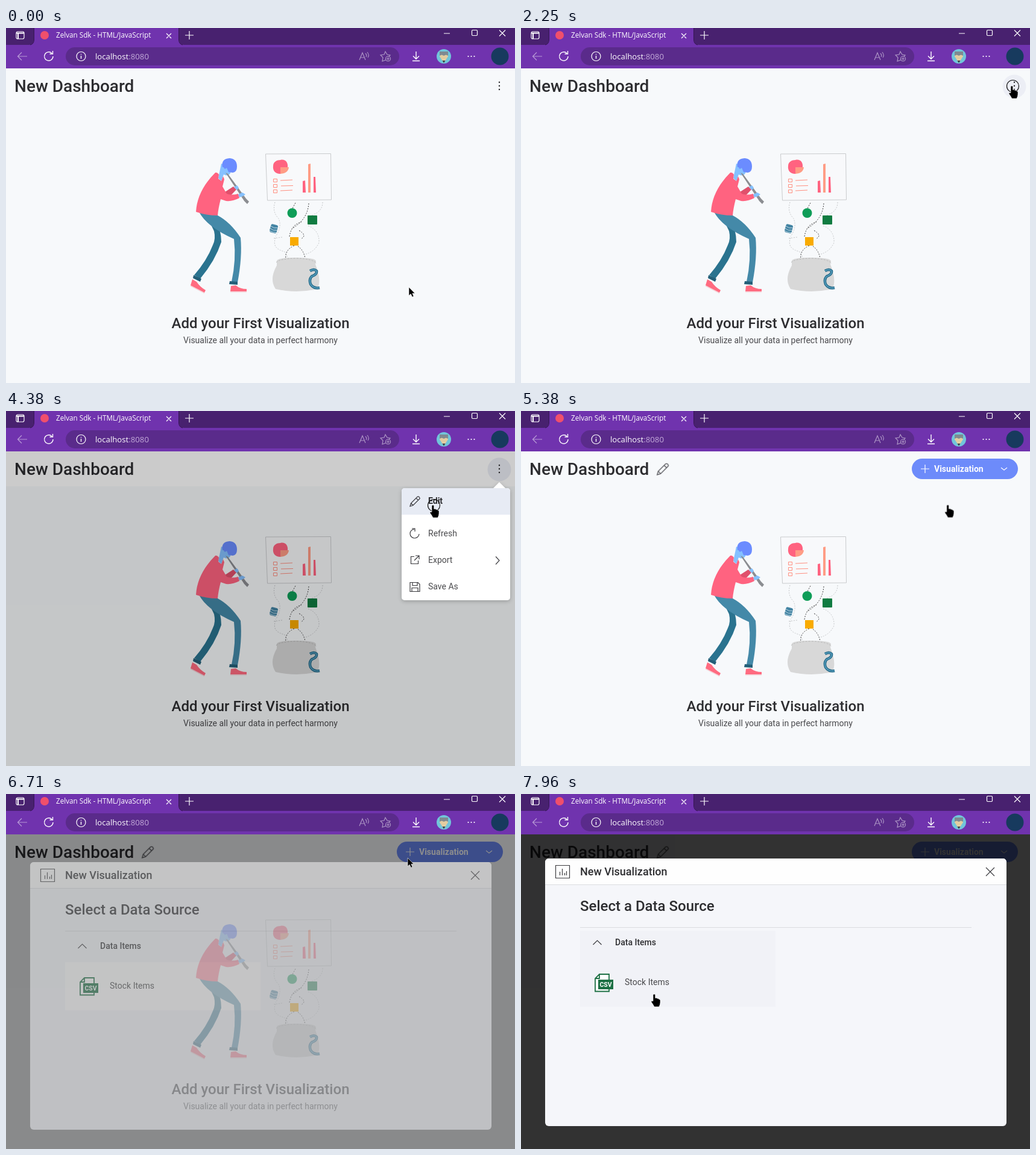
An HTML page that plays this animation: 844x589 px, repeating every 8000 ms.

```html
<!DOCTYPE html>
<html lang="en">
<head>
<meta charset="utf-8">
<title>New Dashboard</title>
<style>
html, body { margin: 0; width: 100%; height: 100%; overflow: hidden; background: #f7f9fb; }
svg { display: block; width: 844px; height: 589px; }
text { font-family: Roboto, sans-serif; fill: #2d2d30; }
.ui { font-family: "Open Sans", "Noto Sans", sans-serif; fill: #fff; }
.h1 { font-size: 28px; font-weight: 500; }
.h2 { font-size: 24px; font-weight: 500; }
.h3 { font-size: 18px; font-weight: 500; }
.p { font-size: 14px; fill: #4a4a4d; }
.m { font-size: 14px; font-weight: 500; }
.b { font-size: 14px; font-weight: 700; }
.ln { fill: none; stroke: #3c3c40; stroke-width: 1.2; }
.w { fill: none; stroke: #fff; stroke-width: 1.2; }
.dim { opacity: .5; }

.st { opacity: 0; animation: 8s step-end infinite; }
#head { animation-name: head; }
#hover { animation-name: hover; }
#edit { animation-name: edit; }
#press { animation-name: press; }
#shade { animation-name: shade; }
#menu { animation-name: menu; }
#row { animation-name: row; }
#dark { animation-name: dark; }
#dialog { animation-name: dialog; }
#card { animation-name: card; }
#ring { animation-name: ring; }
#hand { animation-name: hand; }
#arrow { animation-name: arrow; }
#view { animation: view 8s step-end infinite; }
#cur { animation: move 8s ease-in-out infinite; }

@keyframes head { 0%, 57.875% { opacity: 0 } 30% { opacity: 1 } }
@keyframes hover { 0%, 56.875% { opacity: 0 } 16.375% { opacity: 1 } }
@keyframes view { 0% { opacity: 1 } 56.875%, 100% { opacity: 0 } }
@keyframes edit { 0% { opacity: 0 } 56.875%, 100% { opacity: 1 } }
@keyframes press { 0%, 83.875% { opacity: 0 } 70.5% { opacity: 1 } }
@keyframes shade {
  0%, 57.875% { opacity: 0 }
  30% { opacity: .08 } 30.75% { opacity: .185 } 31.375% { opacity: .2 }
  55.875% { opacity: .13 } 56.875% { opacity: .04 }
}
@keyframes menu {
  0%, 57.875% { opacity: 0; transform: translateY(-3px) }
  30% { opacity: .4; transform: translateY(-3px) }
  30.75% { opacity: .99; transform: translateY(-1px) }
  31.375% { opacity: 1; transform: none }
  55.875% { opacity: .6; transform: none }
  56.875% { opacity: .15; transform: none }
}
@keyframes row { 0%, 57.875% { opacity: 0 } 40.75% { opacity: 1 } }
@keyframes dark {
  0% { opacity: 0 } 83.875% { opacity: .45 } 84.625% { opacity: .765 } 85.25%, 100% { opacity: .8 }
}
@keyframes dialog {
  0% { opacity: 0; transform: translateY(8px) }
  83.875% { opacity: .5; transform: translateY(6px) }
  84.625% { opacity: .955; transform: translateY(2px) }
  85.25%, 100% { opacity: 1; transform: none }
}
@keyframes card { 0% { opacity: 0 } 96.875%, 100% { opacity: 1 } }
@keyframes ring { 0%, 30%, 55.875%, 83.125% { opacity: 0 } 28.125%, 54.75%, 82% { opacity: 1 } }
@keyframes hand { 0%, 37%, 67.75%, 83.875% { opacity: 0 } 16.375%, 40.75%, 70.5%, 96.875%, 100% { opacity: 1 } }
@keyframes arrow { 0%, 37%, 67.75%, 83.875% { opacity: 1 } 16.375%, 40.75%, 70.5%, 96.875%, 100% { opacity: 0 } }
@keyframes move {
  0%, 7% { transform: translate(668px, 430px) }
  17.375%, 19.6% { transform: translate(813px, 95px) }
  19.625%, 35.8% { transform: translate(814px, 96px) }
  45%, 48.1% { transform: translate(709px, 155px) }
  48.125%, 67% { transform: translate(708px, 156px) }
  72%, 91.6% { transform: translate(666px, 106px) }
  99.5%, 100% { transform: translate(221px, 332px) }
}
</style>
</head>
<body>
<svg viewBox="0 0 844 589">
  <defs>
    <path id="pencil" d="M-8 8L-6.5 3L4-7.5Q5.5-8.800 7.200-7.200Q8.800-5.500 7.500-4L-3 6.500ZM2-5.500L5.500-2M-6.500 3L-3 6.500" fill="none" stroke-width="1.200"/>
    <filter id="soft" x="-10%" y="-10%" width="120%" height="125%">
      <feDropShadow dx="0" dy="2" stdDeviation="3" flood-opacity=".22"/>
    </filter>
  </defs>

  <!-- page -->
  <path d="M0 66H844V589H0Z" fill="#f7f9fb"/>
  <path id="head" class="st" d="M0 66H844V125H0Z" fill="#fff"/>
  <text class="h1" x="14" y="106">New Dashboard</text>
  <g id="view">
    <circle id="hover" class="st" cx="818" cy="97" r="19.500" fill="#eceef5"/>
    <path d="M818 90v.01M818 96v.01M818 102v.01" stroke="#2d2d30" stroke-width="2.400" stroke-linecap="round"/>
  </g>
  <g id="edit" class="st">
    <use href="#pencil" transform="translate(235 96.500) scale(1.150)" stroke="#55555a"/>
    <rect x="648" y="79" width="176" height="34" rx="17" fill="#6d8bfa"/>
    <path id="press" class="st" d="M782 79H665a17 17 0 0 0 0 34H782Z" fill="#5268ba"/>
    <path class="w" d="M663 96h14M670 89v14M796 94l5 4 5-4"/>
    <text class="b" x="685" y="101" style="fill:#fff">Visualization</text>
  </g>

  <!-- piper -->
  <path d="M334 314L345 337Q348 350 343 360Q333 386 312 410L322 416Q347 386 357 355Q357 335 348 322Z" fill="#2a738f"/>
  <path d="M320 305Q333 330 378 350Q382 385 374 421L384 422Q392 380 389 348Q372 322 351 311Z" fill="#4489a8"/>
  <path d="M311 410l13 6-2 5-12-6ZM371 420l13 1v5l-14-1Z" fill="#235f78"/>
  <path d="M309 417L316 421Q322 430 331 435L329 439L306 427ZM373 428L381 427Q388 433 399 433V437H372Z" fill="#ff6b80"/>
  <path d="M306 428L329 440M372 438H399" stroke="#f4c3c8" stroke-width="1"/>
  <path d="M357 225L374 231L372 241Q368 247 361 243L357 254L352 249Z" fill="#85c1ff"/>
  <path d="M359 231Q356 217 371 216Q383 217 383 230Q383 239 376 240L369 239L366 232Q362 236 361 231Z" fill="#6b8cff"/>
  <path d="M364 240L368 242L398 283L403 288L400 292L395 287Z" fill="#8b8d91"/>
  <path d="M360 274L377 263L382 268L367 284Z" fill="#e0506c"/>
  <path d="M347 240Q350 239 353 243L352 250L357 254L360 246L362 251L359 263L366 275Q374 278 385 275L387 282Q376 288 365 287L356 284Q352 299 351 311Q332 311 315 305Q317 270 347 240Z" fill="#ff6380"/>
  <path d="M378 264l5-3 3 4-3 4ZM385 276l7-3 5 3-4 3-6 2Z" fill="#85c1ff"/>

  <!-- board -->
  <path d="M430.500 209L538.500 208.500L539.500 285L433.500 286Z" fill="#f8f9fb" stroke="#c9cbcd"/>
  <path d="M455 219C463 217 468 223 467 231L455 231V242C446 242 442 236 443 229C443 222 449 219 455 219Z" fill="#ff6380"/>
  <path d="M455 231L469 231Q468 241 455 242Z" fill="#ff9c85"/>
  <path d="M443.500 250.500h6v5h-6ZM443.500 259.500h6v5h-6ZM443.500 268.500h6v5h-6ZM455 253l20-1M456 262l20-.5M455 270l20-1" fill="none" stroke="#ff8f80"/>
  <path d="M492 254l4-1 1 20h-5ZM510 247h3l1 26h-4Z" fill="#ff6380"/>
  <path d="M501 226l4-1V273H501Z" fill="#ff9c85"/>

  <!-- strings and pot -->
  <g fill="none" stroke-width="1" stroke-dasharray="2 2">
    <path d="M446 289Q441 305 452 316Q458 330 447 346M447 348Q440 366 462 371L468 382M525 289Q525 305 506 311M501 328Q520 336 519 356Q512 372 494 376M444 349L458 347" stroke="#c4c6c8"/>
    <path d="M480 290L474 301M502 291Q500 318 474 333M470 346Q473 326 490 322M486 336Q500 344 489 350M478 361Q458 370 466 391M484 362Q497 371 497 393" stroke="#3b3b3b"/>
  </g>
  <path d="M449 387Q448 381 481 381Q514 381 514 387L513 392Q524 420 516 433Q482 441 447 433Q436 417 449 394Z" fill="#d8d8d8"/>
  <path d="M448 389Q453 383 481 382Q510 383 515 391" fill="none" stroke="#b9b9b9" stroke-dasharray="3 2"/>
  <path d="M504 403Q511 399 515 403Q516 409 507 412Q502 417 505 425Q510 433 520 431" fill="none" stroke="#256b89" stroke-width="4.500"/>
  <path d="M504 403Q511 399 515 403Q516 409 507 412Q502 417 505 425Q510 433 520 431" fill="none" stroke="#5aa0c0" stroke-width="1.600"/>
  <circle cx="474.500" cy="307" r="8" fill="#0f9d58"/>
  <rect x="500" y="311" width="16" height="15" rx="1" fill="#107c41"/>
  <rect x="471" y="347" width="14" height="14" fill="#f9ab00"/>
  <g transform="rotate(15 444 333)">
    <rect x="438" y="326" width="12" height="14" rx="3" fill="#4384a3"/>
    <path d="M438 330q6 3 12 0M438 334q6 3 12 0M438 338q6 2 12 0" fill="none" stroke="#cfe2ec" stroke-width=".8"/>
  </g>
  <text class="h2" x="422" y="498" text-anchor="middle">Add your First Visualization</text>
  <text class="p" x="422" y="523" text-anchor="middle">Visualize all your data in perfect harmony</text>

  <!-- menu -->
  <path id="shade" class="st" d="M0 67H844V589H0Z"/>
  <g id="menu" class="st">
    <path d="M661 128H808L818 118L828 128H831a5 5 0 0 1 5 5V309a5 5 0 0 1-5 5H661a5 5 0 0 1-5-5V133a5 5 0 0 1 5-5Z" fill="#fff" filter="url(#soft)"/>
    <path id="row" class="st" d="M661 128H831a5 5 0 0 1 5 5V172H656V133a5 5 0 0 1 5-5Z" fill="#e7ebf4"/>
    <use href="#pencil" transform="translate(678 150)" stroke="#3c3c40"/>
    <g class="ln">
      <path d="M677 196A7.500 7.500 0 1 0 685 204M673 195h5v5"/>
      <path d="M677 241.500h-5.500v12h12V248M679 240h6v6M685 240l-8 8"/>
      <path d="M670 284.500h13l3 3v12h-16ZM674 284.500v5h8v-5M673 299.500v-6h10v6M812 241.500l6 6.500-6 6.500"/>
    </g>
    <text class="b" x="700" y="154">Edit</text>
    <text class="p" x="700" y="208">Refresh</text>
    <text class="p" x="700" y="252">Export</text>
    <text class="p" x="700" y="296">Save As</text>
  </g>

  <!-- dialog -->
  <path id="dark" class="st" d="M0 67H844V589H0Z"/>
  <g id="dialog" class="st">
    <rect x="40" y="107" width="765" height="444" rx="6" fill="#f5f6fa"/>
    <path d="M40 150V113a6 6 0 0 1 6-6H799a6 6 0 0 1 6 6V150Z" fill="#fefefe"/>
    <path d="M40 150.500H805M98 221.500H747" stroke="#dadce0"/>
    <path d="M98 273H422V353H98Z" fill="#fefefe"/>
    <path id="card" class="st" d="M98 227H422V353H98Z" fill="#f1f2f7"/>
    <path class="ln" d="M57.500 118.500h23v21h-23ZM64.500 135v-6M68.500 135v-11M72.500 135v-4M75.500 135v-7M771 122l14 14M785 122l-14 14M119.500 250l7-7 7 7"/>
    <text class="h3" x="98" y="135">New Visualization</text>
    <text class="h2" x="98" y="194">Select a Data Source</text>
    <text class="m" x="156" y="251">Data Items</text>
    <path d="M130 299H146V327.500H123V306ZM130 299V306H123" fill="#fff" stroke="#1d7044" stroke-width="1.800"/>
    <path d="M128 308H153V324H128Z" fill="#1d7044"/>
    <text x="140.500" y="320" text-anchor="middle" style="font-size:10.500px;font-weight:700;fill:#fff">CSV</text>
    <text class="p" x="172" y="317">Stock Items</text>
  </g>

  <!-- browser -->
  <path d="M0 0H844V29H0Z" fill="#48216f"/>
  <path d="M0 28H38Q46 28 46 20V0H287V20Q287 28 295 28H844V67H0Z" fill="#7033ae"/>
  <path d="M46.500 0V20Q46 27 40 28M286.500 0V20Q287 27 293 28" fill="none" stroke="#351553"/>
  <rect x="99" y="32" width="553" height="30" rx="15" fill="#5a2b8b"/>
  <g class="w">
    <rect x="17" y="6" width="13" height="12" rx="2.500"/>
    <path d="M17 8.500h13M20 9v9" stroke-width="2"/>
    <path d="M266 9l8 8M274 9l-8 8M297 12h14M304 5v14M726 9h10M818 3.500l10 10M828 3.500l-10 10"/>
    <rect x="772.500" y="3.500" width="9" height="9" rx="1.500"/>
    <path class="dim" d="M35 47H20M26 40.500L19.500 47L26 53.500"/>
    <path d="M76 42A7.200 7.200 0 1 0 78 47M77.500 38v5h-5" stroke-width="1.400"/>
    <circle cx="124.500" cy="47" r="7.500"/>
    <path d="M124.500 46v5M124.500 43v1.300" stroke-width="1.400"/>
    <g class="dim">
      <path d="M586 53l5-12 5 12M588 49h6M596 42q3 3 1 6M599 40q4 5 1 9"/>
      <path d="M630 53l-6 2 1-6-4-4 6-1 2-5 3 5 5 1-2 2"/>
      <circle cx="633.500" cy="51" r="4"/>
      <path d="M631 51h5M633.500 48.500v5"/>
    </g>
    <path d="M680 39v12M675 46.500l5 5 5-5M674 54.500h12" stroke-width="1.400"/>
    <path d="M766.500 47h.01M771.500 47h.01M776.500 47h.01" stroke-width="2.200" stroke-linecap="round"/>
  </g>
  <circle cx="64" cy="12" r="7" fill="#f04f6c"/>
  <circle cx="726" cy="47" r="12" fill="#71c5da"/>
  <path d="M719 39h14v8l-7 11-7-11Z" fill="#e3cda0"/>
  <path d="M719 39h14v7l-3.500-1.500-3.500 1.500-3.500-1.500-3.500 1.500Z" fill="#7e8a91"/>
  <path d="M723.500 54h5L726 58Z" fill="#35424a"/>
  <circle cx="819" cy="47" r="14.500" fill="#173a5e"/>
  <text class="ui" x="83" y="16" font-size="11.700">Zelvan Sdk - HTML/JavaScript</text>
  <text class="ui" x="148" y="52" font-size="13.200">localhost<tspan fill="#c3abd9">:8080</tspan></text>

  <!-- pointer -->
  <g id="cur">
    <circle id="ring" class="st" cx="1.500" cy=".5" r="10" fill="none" stroke="#111" stroke-width="1.200"/>
    <path id="arrow" class="st" d="M0 0V14L3.200 11.200L5.600 16.200L8 15.200L5.800 10.300H10Z" stroke="#fff" stroke-width=".6"/>
    <path id="hand" class="st" d="M-2 1.500Q-2 0 0 0Q1.700 0 1.700 1.600V6.500Q4 6 5 7.200Q7 7 7.800 8.500Q10 8.500 10 10.500V14Q10 17 8 21H0Q-2 17-5 13Q-5.500 10.500-2 11.500Z" stroke="#fff" stroke-width=".6"/>
  </g>
</svg>
</body>
</html>
```
